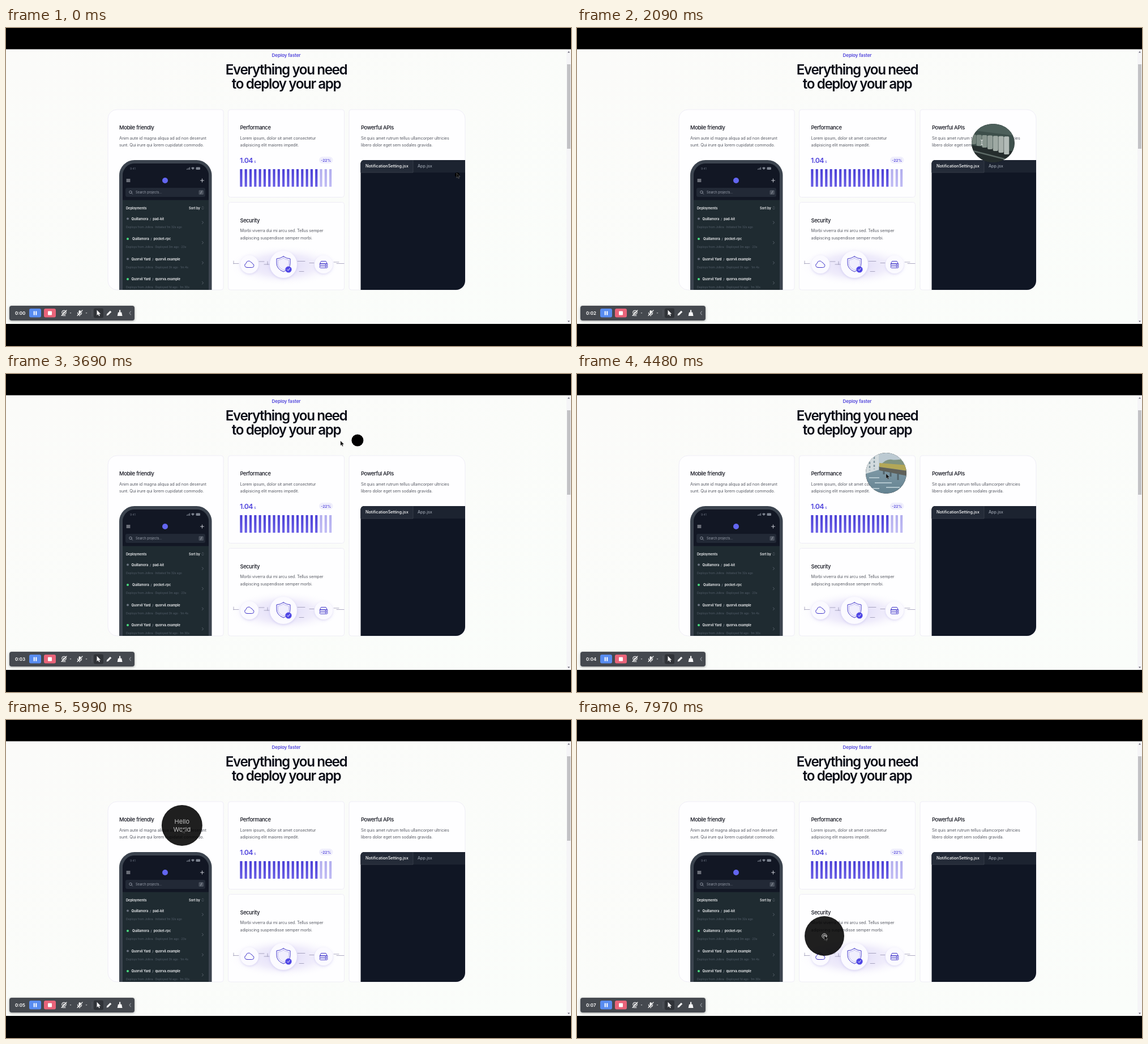
These frames come from a looping animation (998x561 px, 8 s). An HTML page:

```html
<!DOCTYPE html>
<html lang="en">
<head>
<meta charset="utf-8">
<title>Deploy</title>
<style>
html, body { margin: 0; width: 100%; height: 100%; overflow: hidden; background: #000; }
svg { display: block; font-family: Inter, sans-serif; font-optical-sizing: none; }
.title { font-size: 24.2px; font-weight: 600; letter-spacing: -1.4px; fill: #0b0d17; text-anchor: middle; }
.head { font-size: 9.34px; font-weight: 500; letter-spacing: -.35px; fill: #10121c; }
.body { font-size: 7.27px; letter-spacing: -.12px; fill: #5a5d66; }
.tab { font-size: 7.27px; font-weight: 500; letter-spacing: -.05px; }
.app { font-size: 5.7px; font-weight: 600; fill: #f3f4f6; }
.dim { font-size: 5px; fill: #56606d; }
.card { fill: #fefeff; stroke: #ebe9f4; stroke-width: .8; }
.line { fill: none; stroke-linecap: round; stroke-linejoin: round; }
</style>
</head>
<body>
<svg width="998" height="561" viewBox="0 0 998 561">
  <defs>
    <linearGradient id="bar" x2="0" y2="1">
      <stop stop-color="#4a3fd6"/><stop offset="1" stop-color="#6a5fe6"/>
    </linearGradient>
    <linearGradient id="page" x2="1" y2="1">
      <stop stop-color="#fbfbf9"/><stop offset="1" stop-color="#fafdfa"/>
    </linearGradient>
    <radialGradient id="haze">
      <stop stop-color="#e0dbf8"/><stop offset=".55" stop-color="#f0edfb"/><stop offset="1" stop-color="#fefeff" stop-opacity="0"/>
    </radialGradient>
    <linearGradient id="water" x2="0" y2="1">
      <stop stop-color="#8ea7b2"/><stop offset="1" stop-color="#648291"/>
    </linearGradient>
    <filter id="soft" x="-30%" y="-30%" width="160%" height="160%">
      <feDropShadow dx="0" dy="1.5" stdDeviation="2" flood-color="#8f84dd" flood-opacity=".28"/>
    </filter>
    <filter id="drop" x="-10%" y="-40%" width="120%" height="190%">
      <feDropShadow dx="0" dy="1" stdDeviation="2" flood-opacity=".35"/>
    </filter>
    <clipPath id="round"><circle r="36"/></clipPath>
    <clipPath id="phone"><rect x="196" y="228" width="172" height="234"/></clipPath>
    <clipPath id="screen"><path d="M206 462V260a21 21 0 0 1 21-21h110a21 21 0 0 1 21 21v202z"/></clipPath>
  </defs>

  <rect width="998" height="561"/>
  <rect y="37.5" width="998" height="484.5" fill="url(#page)"/>
  <rect x="990" y="38" width="8" height="484" fill="#f5f5f7"/>
  <rect x="991" y="64" width="6" height="149" fill="#c2c2c5"/>
  <path d="M992 43.5l2-2.5 2 2.5zM992 516.5l2 2.5 2-2.5z" fill="#62606f"/>

  <text x="495" y="51.3" font-size="8.1" font-weight="600" letter-spacing="-.1" fill="#5145dc" text-anchor="middle">Deploy faster</text>
  <text class="title" x="495" y="82">Everything you need</text>
  <text class="title" x="495" y="107">to deploy your app</text>

  <path class="card" d="M196 144h184a4 4 0 0 1 4 4v310a4 4 0 0 1-4 4H196a16 16 0 0 1-16-16V160a16 16 0 0 1 16-16z"/>
  <rect class="card" x="392.5" y="144" width="205" height="154.5" rx="4"/>
  <rect class="card" x="392.5" y="307.5" width="205" height="154.5" rx="4"/>
  <path class="card" d="M610 144h185a16 16 0 0 1 16 16v286a16 16 0 0 1-16 16H610a4 4 0 0 1-4-4V148a4 4 0 0 1 4-4z"/>
  <g id="copy"></g>

  <!-- phone -->
  <g clip-path="url(#phone)">
    <rect x="200" y="233" width="163.5" height="270" rx="27" fill="#3c444f"/>
    <g clip-path="url(#screen)">
      <rect x="206" y="239" width="152" height="223" fill="#1f2b31"/>
      <rect x="206" y="239" width="152" height="64.5" fill="#121724"/>
      <rect x="211" y="282" width="141" height="16" rx="3" fill="#222936"/>
    </g>
  </g>
  <text x="219" y="250" font-size="5" fill="#6b7280">9:41</text>
  <g fill="#7d8490">
    <path d="M319 250v-1.5h1v1.5zM320.7 250v-2.5h1v2.5zM322.4 250v-3.5h1v3.5zM324 250v-4.5h1v4.5z"/>
    <path d="M327 247q3-2.8 6 0l-3 3z"/>
    <rect x="335.5" y="245.5" width="7.5" height="4.5" rx="1.2"/>
  </g>
  <circle cx="281" cy="269" r="5" fill="#6366f1"/>
  <g class="line" stroke="#d6d9df" stroke-width=".9">
    <path d="M213 267h6M213 269h6M213 271h6M343.5 269h6M346.5 266v6"/>
    <g stroke="#9299a5"><circle cx="220" cy="289.5" r="2.3"/><path d="M221.8 291.3l1.7 1.7"/></g>
  </g>
  <text x="229" y="292" font-size="5.6" fill="#9aa1ad">Search projects...</text>
  <rect x="340.5" y="286" width="8.5" height="8" rx="1.5" fill="#4a515d"/>
  <path d="M343.7 292.2l2-4.4" class="line" stroke="#b9bec7" stroke-width=".7"/>
  <text class="app" x="212" y="319.5">Deployments</text>
  <text class="app" x="323" y="319.5">Sort by</text>
  <path class="line" d="M346 316.5l1.5-1.5 1.5 1.5M346 318.5l1.5 1.5 1.5-1.5" stroke="#7d8490" stroke-width=".6"/>
  <g id="rows"></g>

  <!-- performance -->
  <text x="413" y="238" font-size="12.4" font-weight="600" letter-spacing="-.6" fill="#4f43dc">1.04</text>
  <text x="438" y="238" font-size="6.8" fill="#4f43dc">s</text>
  <rect x="553" y="227" width="24.5" height="12" rx="6" fill="#f0effc"/>
  <text x="565.2" y="235.5" font-size="6.6" font-weight="600" fill="#5145dc" text-anchor="middle">-22%</text>
  <g id="bars" fill="url(#bar)"></g>

  <!-- security -->
  <ellipse cx="491" cy="419" rx="100" ry="36" fill="url(#haze)"/>
  <path class="line" stroke="#8b87a8" stroke-width=".7" d="M402 415.500h9M402 411v5M447 412h9M456 417h9M462 412v5M515 411.500h13M518 429.500h8M536 414.500h8M579 413h9M584 415.500h13"/>
  <g filter="url(#soft)" fill="#fbfaff"><circle cx="430" cy="417" r="16"/><circle cx="490" cy="417" r="24"/><circle cx="561" cy="417" r="16"/></g>
  <g class="line" stroke="#4338ca" stroke-width="1">
    <path d="M426 422.5h8.5a3.4 3.4 0 0 0 .8-6.7 3.6 3.6 0 0 0-2.700-2.800 4.700 4.700 0 0 0-8.500 2.200 3.800 3.800 0 0 0 1.900 7.300z"/>
    <path d="M490 403q6 4 12 4v8q0 10-12 15-12-5-12-15v-8q6 0 12-4z" fill="#f8f7fe"/>
    <path d="M490 406q4.500 3 9.500 3.300v6q0 7.500-9.500 11.800-9.500-4.300-9.500-11.800v-6q5-.3 9.500-3.300z" fill="#f1effd" stroke="#9e96ea" stroke-width=".6"/>
    <path d="M557 411.500h8l2.500 4.500h-13z"/>
    <rect x="554" y="416" width="14" height="3.6" rx="1.8"/><rect x="554" y="419.6" width="14" height="3.6" rx="1.8"/>
    <path d="M564 417.800h1.500M564 421.400h1.500"/>
  </g>
  <circle cx="499" cy="426" r="5.600" fill="#4f46e5"/>
  <path class="line" d="M496.700 426.200l1.700 1.600 2.900-3.800" stroke="#fff" stroke-width="1"/>

  <!-- editor -->
  <path d="M632.5 233H811v213a16 16 0 0 1-16 16H626.5V239a6 6 0 0 1 6-6z" fill="#101624"/>
  <path d="M632.5 233H811v22H626.5v-16a6 6 0 0 1 6-6z" fill="#1c2330"/>
  <path d="M632.5 233H719v22h-92.5v-16a6 6 0 0 1 6-6z" fill="#242b38"/>
  <path d="M719 233v22M627 255h92" stroke="#434a56" stroke-width=".6"/>
  <text class="tab" x="635" y="246.3" fill="#fff">NotificationSetting.jsx</text>
  <text class="tab" x="727" y="246.3" fill="#9aa1ad">App.jsx</text>

  <!-- recorder bar -->
  <rect x="6" y="490" width="221" height="26" rx="4" fill="#44484f" filter="url(#drop)"/>
  <text id="clock" x="16" y="505.5" font-size="8" font-weight="600" fill="#fff"></text>
  <rect x="41" y="495" width="21" height="15.5" rx="3" fill="#588cf0"/>
  <path d="M49.7 499.5v7M53.3 499.5v7" stroke="#fff" stroke-width="2"/>
  <rect x="67" y="495" width="21" height="15.5" rx="3" fill="#e9647a"/>
  <rect x="74" y="499.5" width="7" height="7" rx="1" fill="#fff"/>
  <rect x="155" y="494.5" width="17" height="17" rx="3" fill="#303338"/>
  <path d="M152 497v12" stroke="#5d6168" stroke-width=".8"/>
  <g fill="#f5f5f6">
    <path d="M112.5 502h3l-1.5 2zM140.5 502h3l-1.5 2z" opacity=".6"/>
    <rect x="128.500" y="498" width="3.400" height="6.500" rx="1.700"/>
    <path d="M160.500 497.500v9.500l2.200-2 1.600 3.300 1.500-.7-1.500-3.200h3z"/>
    <path d="M177.500 507.500l.7-3 5.800-5.800 2.300 2.300-5.800 5.800z"/>
    <path d="M200 497.500h2.200v4h2l1.300 6.500h-8.800l1.300-6.500h2z"/>
  </g>
  <g class="line" stroke="#fff" stroke-width="1.1">
    <circle cx="102.500" cy="501.800" r="3.600"/><circle cx="102.500" cy="501.800" r="1"/>
    <path d="M100 507.500h5M98 507.500l9-9.500M126 507.500l9-9.500M126.500 502q.3 4 3.600 4t3.600-4M130 506v2"/>
    <path d="M220.500 499.800l-2.500 3 2.500 3" stroke="#8e9299"/>
  </g>

  <g id="blob">
    <circle r="36" id="disc"/>
    <g clip-path="url(#round)">
      <g class="face" clip-path="url(#round)">
        <rect x="-36" y="-36" width="72" height="72" fill="#3d4f4b"/>
        <path d="M-36-24L36-14V-36H-36z" fill="#4d605b"/>
        <path d="M-36 4L36 16V36H-36z" fill="#252d2d"/>
        <g id="cans"></g>
        <path d="M-36 14L24 31" stroke="#5d6a66" stroke-width="2.5"/>
      </g>
      <g class="face" clip-path="url(#round)">
        <rect x="-36" y="-36" width="72" height="72" fill="url(#water)"/>
        <rect x="-36" y="-36" width="72" height="24" fill="#bccad2"/>
        <path d="M-10-14q10-12 20-10t28-4v20z" fill="#7f9380"/>
        <path d="M-36-34h23V-6l-23 7z" fill="#d3dbde"/>
        <path d="M-29-27v22M-21-29v22" stroke="#8599a3" stroke-width="2.500" stroke-dasharray="4 3"/>
        <path d="M-12-18L38-14V-4L-12-11z" fill="#b3a757"/>
        <path d="M-12-11L38-4V5L-12-5z" fill="#5f605a"/>
        <path d="M-4-4v6M8-2v8M21 0v12" stroke="#52636a" stroke-width="3"/>
        <path d="M-30 8h18M-20 17h30M0 25h24M-24 27h12" stroke="#b1c5cd" stroke-width="2"/>
      </g>
      <g class="face" font-size="11" fill="#c4c4c4" text-anchor="middle">
        <text y="-3">Hello</text><text y="11">World</text>
      </g>
      <g class="face line" stroke="#e2e2e2" stroke-width="2">
        <circle r="8.500"/><circle r="3.600"/><path d="M3.600-2v4q1.500 3 4 1M3 8l6 4"/>
      </g>
    </g>
  </g>
  <g id="mouse">
    <path id="arrow" d="M0 0v8.300l1.900-1.700 1.300 3 1.400-.6-1.300-2.900h2.700z" fill="#0a0a0a" stroke="#aaa" stroke-width=".4"/>
    <path id="beam" class="line" d="M-1.500-4.500q1.500 0 1.500 1V3.500q0 1-1.500 1M1.500-4.500q-1.500 0-1.500 1M0 3.500q0 1 1.500 1" stroke="#fff" stroke-width=".9"/>
  </g>
</svg>
<script>
const LOOP = 8000;
const $ = id => document.getElementById(id);
const repeat = (n, fn) => Array.from({ length: n }, (_, i) => fn(i)).join('');

const copy = [
  [200, 179, 'Mobile friendly', 'Anim aute id magna aliqua ad ad non deserunt', 'sunt. Qui irure qui lorem cupidatat commodo.'],
  [413.5, 179, 'Performance', 'Lorem ipsum, dolor sit amet consectetur', 'adipisicing elit maiores impedit.'],
  [627, 179, 'Powerful APIs', 'Sit quis amet rutrum tellus ullamcorper ultricies', 'libero dolor eget sem sodales gravida.'],
  [413.5, 342.5, 'Security', 'Morbi viverra dui mi arcu sed. Tellus semper', 'adipiscing suspendisse semper morbi.']
];
$('copy').innerHTML = copy.map(([x, y, head, a, b]) =>
  `<text class="head" x="${x}" y="${y}">${head}</text>
   <text class="body" x="${x}" y="${y + 17.5}">${a}</text>
   <text class="body" x="${x}" y="${y + 30}">${b}</text>`).join('');

const rows = [
  ['Quillamora', 'pad-kit', 'Initiated 1m 32s ago', '#6b7280'],
  ['Quillamora', 'pocket-rpc', 'Deployed 3m ago · 23s', '#4ade80'],
  ['Quorvil Yard', 'quorvil.example', 'Deployed 3h ago · 1m 4s', '#6b7280'],
  ['Quorvil Yard', 'quorva.example', 'Deployed 1d ago · 1m 30s', '#4ade80']
];
$('rows').innerHTML = rows.map(([team, app, note, dot], i) => {
  const y = 336.5 + i * 35.5;
  return `<circle cx="215" cy="${y}" r="2" fill="${dot}"/>
    <text class="app" x="${i === 1 ? 223 : 221.5}" y="${y + 2}">${team} <tspan fill="#8a919d" dx="1.5">/</tspan> <tspan dx="1.5">${app}</tspan></text>
    <text class="dim" x="212" y="${y + 16}">Deploys from Jolkra · ${note}</text>
    <path class="line" d="M346.5 ${y + 4.5}l2 2.2-2 2.2" stroke="#737b87" stroke-width=".7"/>`;
}).join('');

$('bars').innerHTML = repeat(20, i =>
  `<rect x="${413.3 + i * 8.3}" y="249" width="4.2" height="31" rx=".6" opacity="${i < 17 ? 1 : .42}"/>`);
$('cans').innerHTML = repeat(7, i =>
  `<rect x="${-37 + i * 9.2}" y="${-16 + i * .6}" width="8.6" height="${18 + i * 2.6}" rx="2" fill="hsl(150 6% ${48 + i * 4}%)"/>`);

// time, blob x, y, rx, ry, pointer x, y, face scale
const keys = [
  [1000, 797, 259, 4, 4, 796, 256, 0],
  [1300, 799, 212, 11, 13, 798, 190, 0],
  [1600, 776, 200, 35, 36, 772, 200, .8],
  [2090, 735, 203, 38, 34, 715, 202, 1],
  [2640, 722, 190, 36, 36, 718, 182, 1],
  [2850, 692, 154, 18, 16, 675, 142, .1],
  [3040, 664, 138, 10.5, 10.5, 662, 136, 0],
  [3220, 664, 138, 10.5, 10.5, 662, 136, 0],
  [3690, 621, 117, 10.5, 10.5, 591, 118, 0],
  [4040, 577, 124, 10.5, 11, 560, 138, 0],
  [4480, 546, 175, 36, 36, 546, 176, 1],
  [5000, 546, 173, 36, 36, 543, 175, 1],
  [5250, 361, 184, 28, 23, 334, 185, .4],
  [5330, 334, 186, 30, 27, 318, 188, 0],
  [5600, 310, 188, 36, 36, 309, 190, 1],
  [6490, 313, 183, 36, 36, 314, 190, 1],
  [6700, 314, 186, 22, 25.5, 314, 230, .85],
  [6880, 330, 258, 11, 13, 350, 300, 0],
  // the last stop, on the security card
  [7350, 484, 349, 36, 35, 484, 350, .4],
  [7970, 437, 381, 35, 35, 437, 380, .5]
];

// Monotone cubic through the keys: no overshoot, still at rests.
const slope = (i, c) => {
  const p = keys[i], q = keys[i + 1];
  return p && q ? (q[c] - p[c]) / (q[0] - p[0]) : 0;
};
const tangent = (i, c) => {
  const a = slope(i - 1, c), b = slope(i, c);
  return a * b <= 0 ? 0 : 2 * a * b / (a + b);
};
function pose(t) {
  const next = keys.findIndex(k => k[0] > t);
  if (next < 1) return keys.at(next).slice(1);
  const i = next - 1, p = keys[i], q = keys[next];
  const h = q[0] - p[0], u = (t - p[0]) / h, s = u * u * (3 - 2 * u);
  return p.slice(1).map((v, n) => {
    const c = n + 1;
    const bend = (1 - u) * tangent(i, c) - u * tangent(next, c);
    return v + (q[c] - v) * s + h * u * (1 - u) * bend;
  });
}

const faces = document.querySelectorAll('.face');
const faceAt = t => t < 3200 ? 0 : t < 5330 ? 1 : t < 6880 ? 2 : 3;
const show = (el, on) => el.setAttribute('visibility', on ? 'visible' : 'hidden');

function draw() {
  const t = performance.now() % LOOP;
  const [x, y, rx, ry, mx, my, k] = pose(t);
  const grown = Math.min(1, Math.max(0, (rx - 10.5) / 10));
  $('blob').setAttribute('transform', `translate(${x} ${y}) scale(${rx / 36} ${ry / 36})`);
  $('disc').setAttribute('fill-opacity', 1 - .12 * grown);
  faces.forEach((face, i) => {
    show(face, i === faceAt(t) && k > .01);
    face.setAttribute('transform', `scale(${Math.max(k, .01)})`);
  });
  const typing = t > 1750 && t < 2500;
  $('mouse').setAttribute('transform', `translate(${mx} ${my})`);
  show($('arrow'), !typing);
  show($('beam'), typing);
  $('clock').textContent = '0:0' + Math.floor(t / 1000);
  requestAnimationFrame(draw);
}
draw();
</script>
</body>
</html>
```
